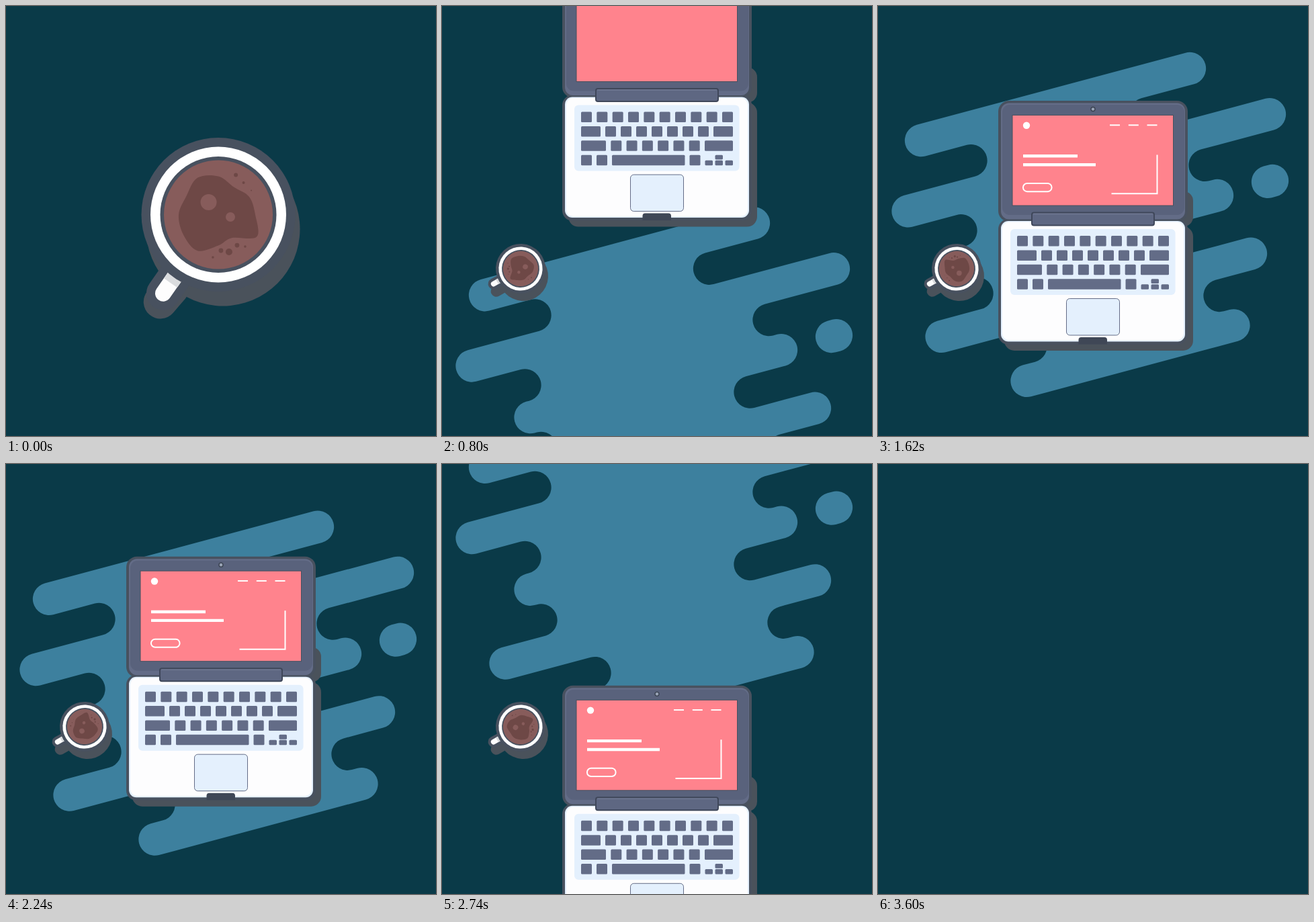
An HTML page for the animation above (3620 ms loop, 640 by 640 pixels).

```html
<!DOCTYPE html>
<html lang="en">
<head>
<meta charset="utf-8">
<title>Coffee and laptop</title>
<style>
html, body { margin: 0; width: 100%; height: 100%; overflow: hidden; background: #0a3a48; }
svg { display: block; width: 100vw; height: 100vh; }
.edge { fill: #48515f; }
.shade { fill: #4a525b; }
.key { fill: #636c87; }
.tray { fill: #e4f0fd; }
.ink { fill: none; stroke: #fff; stroke-width: 2; }
.bold { stroke-width: 4.4; }
.coffee { fill: #875c5b; }
.foam { fill: #6e4846; }
</style>
</head>
<body>
<svg viewBox="0 0 640 640">
  <g id="blob" fill="#3d809e"></g>

  <g id="laptop">
    <g class="shade">
      <rect x="200" y="276" width="269" height="52" rx="14"/>
      <rect x="188" y="328" width="281" height="185" rx="15"/>
    </g>
    <rect class="edge" x="179" y="141" width="282" height="180" rx="16"/>
    <rect class="edge" x="179" y="317" width="282" height="187" rx="15"/>
    <rect class="key" x="183" y="144.5" width="274" height="173" rx="12"/>
    <rect x="185" y="147" width="271" height="164" rx="11" fill="#59627c"/>
    <rect x="200" y="162.5" width="239.5" height="134.5" fill="#ff838d" stroke="#48515f"/>
    <circle cx="320" cy="153.5" r="3" fill="#98a3b5" stroke="#39414f" stroke-width="1.3"/>
    <rect class="tray" x="183" y="320" width="274" height="179.5" rx="11"/>
    <rect x="185" y="321.5" width="270" height="176" rx="10" fill="#fdfdfe"/>
    <rect x="229" y="307.5" width="182" height="19" rx="3" fill="#5e6782" stroke="#3f475a" stroke-width="2"/>
    <path d="M231 309.5H409" stroke="#6f7892" stroke-width="1.5"/>
    <rect class="tray" x="197" y="332" width="245.5" height="98" rx="6"/>
    <g id="keys" class="key"></g>
    <rect class="tray" x="280.5" y="435.5" width="79" height="54.5" rx="5" stroke="#636c87"/>
    <path d="M298.5 503.5V497q0-4 4-4H337q4 0 4 4V503.5Z" fill="#3f4756"/>
    <circle id="dot" cx="221" cy="177.8" fill="#fff"/>
    <g id="page">
      <path class="ink" d="M345 177.3h15"/>
      <path class="ink" d="M372.8 177.3h15"/>
      <path class="ink" d="M400.5 177.3h15"/>
      <path class="ink bold" d="M216 223.3h81"/>
      <path class="ink bold" d="M216 236.2h108"/>
      <path class="ink" d="M222 264h30.5a6 6 0 0 1 0 12.2h-30.5a6 6 0 0 1 0-12.2Z"/>
      <path class="ink" d="M415.5 221.5v57.7h-68"/>
    </g>
  </g>

  <g id="cup">
    <g id="shade" class="shade">
      <circle r="114.5"/>
      <rect x="-25" y="90" width="50" height="78" rx="25" transform="rotate(35)"/>
    </g>
    <g id="mug">
      <g transform="rotate(35)">
        <rect class="edge" x="-25" y="90" width="50" height="78" rx="25"/>
        <path d="M-12 112H12V143a12 12 0 0 1-24 0Z" fill="#fdfdfd"/>
        <path d="M-12 112H12V124H-12Z" fill="#dadcde"/>
      </g>
      <circle class="edge" r="114.5"/>
      <circle r="101" fill="#fff"/>
      <circle class="edge" r="86.5"/>
      <g id="drink">
        <circle class="coffee" r="81"/>
      </g>
    </g>
  </g>
</svg>
<script>
const LOOP = 3620;
const $ = id => document.getElementById(id);
const fill = (n, v) => Array(n).fill(v);

function add(parent, tag, attrs) {
  const el = document.createElementNS('http://www.w3.org/2000/svg', tag);
  for (const k in attrs) el.setAttribute(k, attrs[k]);
  return parent.appendChild(el);
}

// Splash: evenly spaced bands on a 15 degree slant; even ones end in tips, odd ones in notches.
const SLANT = Math.PI / 12, GAP = 50, R = GAP / 2 * Math.cos(SLANT);
const UX = R * Math.sin(SLANT), UY = R * Math.cos(SLANT);
const bandY = (x, k) => 217.3 + GAP * k - x * Math.tan(SLANT);
function end(x, k, side) {
  const y = bandY(x, k);
  return `${x - side * UX} ${y - side * UY}A${R} ${R} 0 0 ${1 - k % 2} ${x + side * UX} ${y + side * UY}`;
}
function splash(left, right) {
  const path = [...right.map((x, k) => end(x, k, 1)), ...left.map((x, k) => end(x, k, -1)).reverse()];
  add($('blob'), 'path', { d: `M${path.join('L')}Z` });
}
splash([64, 138.5, 44.5, 123.5, 131.5, 147.5, 94.5, 227.5, 221.5],
  [464, 398, 583, 486.5, 505, 458.5, 555, 508.5, 529.5]);
add($('blob'), 'path', { d: `M${end(587, 4, 1)}L${end(580, 4, -1)}Z` });

// Keyboard: each row spreads its keys over the full width.
const KEY = 16, ROW_W = 226;
const key = (x, y, width, height) => add($('keys'), 'rect', { x, y, width, height, rx: 1.5 });
const rows = [
  fill(10, KEY),
  [29, ...fill(7, KEY), 29],
  [37, ...fill(6, KEY), 42],
  [KEY, KEY, 108.5, KEY, 41.5]
];
rows.forEach((widths, r) => {
  const gap = (ROW_W - widths.reduce((a, b) => a + b)) / (widths.length - 1);
  let x = 207, y = 342 + 21.4 * r;
  for (const w of widths) {
    if (w === 41.5) {
      key(x + 15, y, 11.5, 6.8);
      for (let i = 0; i < 3; i++) key(x + 15 * i, y + 8, 11.5, 7.5);
    } else key(x, y, w, 15.5);
    x += w + gap;
  }
});

// Coffee: foam outline as radii at equal angles, joined smoothly
function smooth(radii) {
  const n = radii.length;
  const at = i => {
    const a = 2 * Math.PI * i / n, r = radii[(i + n) % n];
    return [r * Math.cos(a), r * Math.sin(a)];
  };
  let d = 'M' + at(0);
  for (let i = 0; i < n; i++) {
    const [a, b, c, e] = [at(i - 1), at(i), at(i + 1), at(i + 2)];
    d += `C${[0, 1].map(k => b[k] + (c[k] - a[k]) / 6)} ${[0, 1].map(k => c[k] - (e[k] - b[k]) / 6)} ${c}`;
  }
  return d + 'Z';
}
add($('drink'), 'path', { d: smooth([55, 66, 40, 46, 62, 60, 59, 55, 63, 57, 47, 53]), class: 'foam' });
const drop = (cx, cy, r, tone = 'foam') => add($('drink'), 'circle', { cx, cy, r, class: tone });
drop(-14.5, -18.5, 12, 'coffee');
drop(18, 3.5, 7, 'coffee');
for (let i = 0; i < 3; i++) drop(26 + 11.5 * i, -59 + 11.5 * i, 3 - i);
for (let i = 0; i < 5; i++) drop(-8 + 12 * i, 63.5 - 4 * i - 6 * (i % 2), 5 - 1.6 * Math.abs(i - 2));

// Motion
function ease(u) {
  u = Math.min(1, Math.max(0, u));
  return u * u * (3 - 2 * u);
}
const mix = (a, b, u) => a + (b - a) * u;
const span = (t, from, to) => ease((t - from) / (to - from));
const move = (id, value) => $(id).setAttribute('transform', value);

// Slide in past the resting place, settle, draw back, slide out on the other side.
function slide(t, start, far, leave, out) {
  const over = 25 * Math.sign(out);
  if (t < 1130) return mix(far, over, span(t, start, 1130));
  if (t < leave) return over * (1 - span(t, 1130, 1420) - span(t, leave - 240, leave));
  return mix(-over, out, span(t, leave, 3258));
}

const strokes = [...$('page').children];
for (const el of strokes) {
  el.setAttribute('pathLength', 1);
  el.setAttribute('stroke-dasharray', '1 2');
}

function draw(t) {
  move('laptop', `translate(0 ${slide(t, 316, -560, 2426, 640)})`);
  move('blob', `translate(0 ${slide(t, 350, 640, 2457, -740)})`);

  $('dot').setAttribute('r', 5.2 * span(t, 1180, 1380));
  strokes.forEach((el, i) => {
    const u = span(t, 1200 + 20 * i, 1460 + 20 * i);
    el.style.visibility = u > 0 ? 'visible' : 'hidden';
    el.style.strokeDashoffset = 1 - u;
  });

  const u = span(t, 10, 410) - span(t, 3020, 3460), leaving = t > 2000;
  const size = mix(1, 0.323, u), turn = 25.7 * u;
  const sx = mix(leaving ? 24 : 7, 4, u), sy = mix(leaving ? 34 : 21.5, 11, u);
  $('cup').style.visibility = t < 3480 ? 'visible' : 'hidden';
  move('cup', `translate(${mix(316, 117, u)} ${mix(310.5, 391, u)})`);
  move('shade', `translate(${sx} ${sy}) rotate(${turn + 5.7 * (1 - u)}) scale(${size})`);
  move('mug', `rotate(${turn}) scale(${size})`);
  move('drink', `rotate(${t / 10})`);
}

const start = performance.now();
function tick() {
  draw((performance.now() - start) % LOOP);
  requestAnimationFrame(tick);
}
draw(0);
requestAnimationFrame(tick);
</script>
</body>
</html>
```
